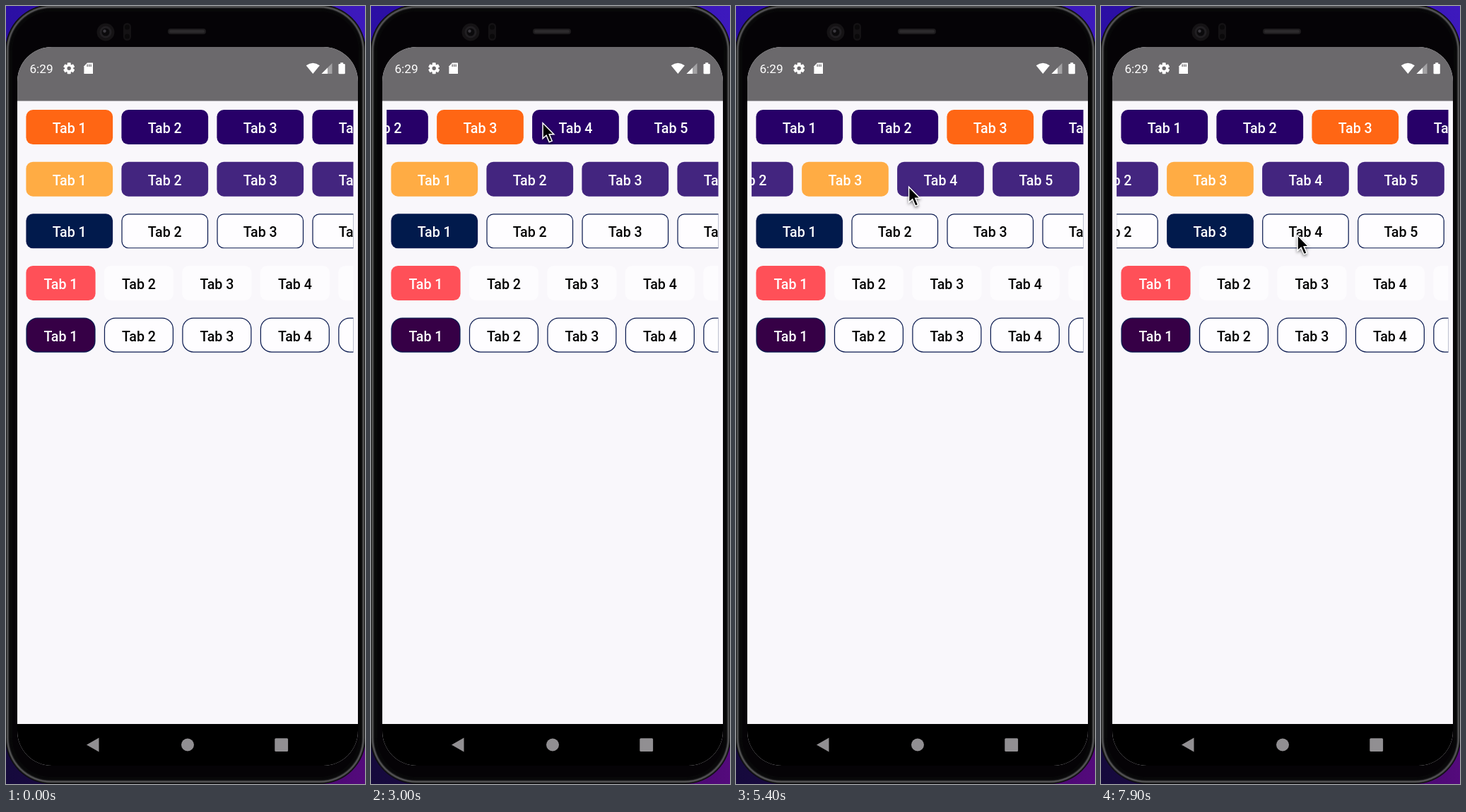
An HTML page with a canvas for the animation above (8 s loop, 508 by 1102 pixels).

```html
<!DOCTYPE html>
<html lang="en">
<head>
<meta charset="utf-8">
<title>Tab rows</title>
<style>
  html, body { margin: 0; width: 100%; height: 100%; overflow: hidden; background: #000; }
  canvas { display: block; width: 508px; height: 1102px; }
</style>
</head>
<body>
<canvas id="stage"></canvas>
<script>
const W = 508, H = 1102, LOOP = 8000;
const DP = 482 / 392.73;          // pixels per density-independent unit
const MAX_SCROLL = 205.3;
const BAR = '#6b696c', NAVY = '#0a1a50';
const canvas = document.getElementById('stage');
const ctx = canvas.getContext('2d');
const dpr = window.devicePixelRatio || 1;
canvas.width = W * dpr;
canvas.height = H * dpr;

// Every visit to a row runs the same script, in ms after its start.
const STEP = { tap2: 220, leave: 250, reach3: 600, tap3: 670, rest: 870,
  grab: 950, drop: 1350, regrab: 1550, redrop: 1950 };

const rows = [
  { w: 100, r: 8, on: '#ff6614', off: '#270068', ink: '#fff',
    visit: { start: 1550, from: [231, 169], to: [243, 166], back: true } },
  { w: 100, r: 8, on: '#ffac44', off: '#43257f', ink: '#fff',
    visit: { start: 3950, from: [214, 235], to: [245, 254] } },
  { w: 100, r: 8, on: '#011a4c', off: '#fefdff', ink: '#000', line: NAVY,
    visit: { start: 6100, from: [235, 311], to: [278, 325] } },
  { w: 80, r: 8, on: '#ff5058', off: '#fdfcfe', ink: '#000' },
  { w: 80, r: 13, on: '#360046', off: '#fefdff', ink: '#000', line: NAVY }
];

function visitPath({ start, from, to, back }) {
  const [x, y] = to, right = x + MAX_SCROLL;
  const keys = [[0, ...from], [STEP.leave, ...from], [STEP.reach3, 377, y],
    [STEP.rest, 377, y], [STEP.grab, right, y], [STEP.drop, x, y]];
  if (back) keys.push([STEP.regrab, x, y], [STEP.redrop, right, y]);
  return keys.map(([t, ...at]) => [start + t, ...at]);
}

const path = [[1150, 512, 420], ...rows.filter(r => r.visit).flatMap(r => visitPath(r.visit))];

const ease = k => k * k * (3 - 2 * k);
const ramp = (t, a, b) => ease(Math.min(1, Math.max(0, (t - a) / (b - a))));

function rowState({ visit }, t) {
  if (!visit) return { active: 1, scroll: 0 };
  const s = t - visit.start;
  let pull = ramp(s, STEP.grab, STEP.drop);
  if (visit.back) pull -= ramp(s, STEP.regrab, STEP.redrop);
  return { active: 1 + (s >= STEP.tap2) + (s >= STEP.tap3), scroll: MAX_SCROLL * pull };
}

function fillBox(x, y, w, h, r, color) {
  ctx.beginPath();
  ctx.roundRect(x, y, w, h, r);
  ctx.fillStyle = color;
  ctx.fill();
}

function disc(x, y, r, color) {
  ctx.beginPath();
  ctx.arc(x, y, r, 0, Math.PI * 2);
  ctx.fillStyle = color;
  ctx.fill();
}

function poly(points, color) {
  ctx.beginPath();
  points.forEach(([x, y]) => ctx.lineTo(x, y));
  ctx.closePath();
  ctx.fillStyle = color;
  ctx.fill();
}

function backdrop(y, ...colors) {
  const g = ctx.createLinearGradient(0, 0, W, 0);
  colors.forEach((c, i) => g.addColorStop(i / (colors.length - 1), c));
  ctx.fillStyle = g;
  ctx.fillRect(0, y, W, H / 2);
}

function drawPhone() {
  backdrop(0, '#2b0fa4', '#3d19bd');
  backdrop(H / 2, '#150a3c', '#2a0750', '#540a7c');

  // metal rim: brightest a few pixels in, fading to black
  for (let d = 0; d <= 9; d += 0.5) {
    const v = Math.round(8 + 82 * Math.exp(-(((d - 3) / 1.6) ** 2)));
    fillBox(d - 1, d - 2, W + 2 - 2 * d, H + 2 - 2 * d, 65 - d, `rgb(${v},${v},${v + 1})`);
  }
  fillBox(9, 8, W - 18, H - 18, 55, '#050306');

  disc(141, 37, 12.5, '#151315');
  disc(141, 37, 8.5, '#211f22');
  disc(141, 37, 5.5, '#0b0a0c');
  disc(139.5, 35.5, 2.2, '#3b393f');
  fillBox(166, 24, 11, 25, 5.5, '#141214');
  for (const y of [30, 43]) disc(171.5, y, 3.5, '#0a090a');
  fillBox(229, 32, 54, 8, 4, '#1d1b1d');
  fillBox(231, 34, 50, 4, 2, '#2c2a2c');
}

function drawGear(x, y) {
  ctx.save();
  ctx.translate(x, y);
  for (let i = 0; i < 6; i++) {
    fillBox(-2.5, -8, 5, 6, 0.8, '#fff');
    ctx.rotate(Math.PI / 3);
  }
  disc(0, 0, 5.9, '#fff');
  disc(0, 0, 2.7, BAR);
  ctx.restore();
}

function drawStatus() {
  ctx.font = '17.2px Roboto, sans-serif';
  ctx.textAlign = 'left';
  ctx.fillStyle = '#fff';
  ctx.fillText('6:29', 33.4, 95);
  drawGear(89.2, 88.3);

  poly([[115, 80.5], [123, 80.5], [123, 96], [110.4, 96], [110.4, 85.2]], '#fff');
  ctx.fillStyle = BAR;
  for (let i = 0; i < 3; i++) ctx.fillRect(114.5 + 2.5 * i, 82.5, 1.3, 3.5);

  ctx.beginPath();
  ctx.moveTo(434.3, 96);
  ctx.lineTo(424.7, 84.3);
  ctx.quadraticCurveTo(434.3, 77, 443.9, 84.3);
  ctx.closePath();
  ctx.fillStyle = '#fff';
  ctx.fill();

  const signal = (size, color) =>
    poly([[446.5, 96], [446.5 + size, 96], [446.5 + size, 96 - size]], color);
  signal(15, '#a3a2a4');
  signal(8.5, '#fff');

  fillBox(470.5, 82, 9.3, 14.3, 1.3, '#fff');
  ctx.fillRect(473.2, 80.2, 4, 2.5);
}

function drawNav() {
  const grey = '#918f92';
  ctx.fillStyle = '#000';
  ctx.fillRect(16, 1017, 482, 60);
  poly([[114, 1046.5], [131.5, 1036.5], [131.5, 1056.5]], grey);
  disc(257, 1046.5, 9, grey);
  fillBox(380.3, 1037.3, 18.8, 18.8, 1.5, grey);
}

function drawRow(row, index, t) {
  const y = 147 + index * 60 * DP, w = row.w * DP, h = 40 * DP;
  const { active, scroll } = rowState(row, t);

  ctx.save();
  ctx.beginPath();
  ctx.rect(22.1, y - 2, 469.4, h + 4);
  ctx.clip();
  ctx.font = '500 19.6px Roboto, sans-serif';
  ctx.textAlign = 'center';
  for (let tab = 1; tab <= 5; tab++) {
    const x = 28.4 + (tab - 1) * (row.w + 10) * DP - scroll;
    const fill = tab === active ? row.on : row.off;
    const r = row.r * DP, b = 1.23;
    fillBox(x, y, w, h, r, row.line || fill);
    if (row.line) fillBox(x + b, y + b, w - 2 * b, h - 2 * b, r - b, fill);
    ctx.fillStyle = tab === active ? '#fff' : row.ink;
    ctx.fillText('Tab ' + tab, x + w / 2, y + 33);
  }
  ctx.restore();
}

function drawScreen(t) {
  ctx.save();
  ctx.beginPath();
  ctx.roundRect(16, 58, 482, 1018, 49);
  ctx.clip();
  ctx.fillStyle = '#f9f7fb';
  ctx.fillRect(16, 58, 482, 1018);
  ctx.fillStyle = BAR;
  ctx.fillRect(16, 58, 482, 76.5);
  drawStatus();
  rows.forEach((row, i) => drawRow(row, i, t));
  drawNav();
  ctx.restore();
}

function pointerAt(t) {
  const i = path.findIndex(p => p[0] > t);
  if (i < 0) return path[path.length - 1].slice(1);
  const [a, x0, y0] = path[i - 1], [b, x1, y1] = path[i];
  const k = ramp(t, a, b);
  return [x0 + (x1 - x0) * k, y0 + (y1 - y0) * k];
}

function drawPointer(t) {
  if (t < path[0][0]) return;
  const [x, y] = pointerAt(t);
  const arrow = [[0, 0], [0, 18.5], [4.6, 14.3], [8.8, 24.2], [11.4, 23.1],
    [7.3, 13.4], [13.2, 13.4]];
  ctx.save();
  ctx.translate(x + 0.8, y + 1.6);
  ctx.shadowColor = 'rgba(0,0,0,.4)';
  ctx.shadowBlur = 4 * dpr;
  ctx.shadowOffsetY = 2 * dpr;
  poly(arrow, '#000');
  ctx.strokeStyle = '#fff';
  ctx.lineWidth = 3;
  ctx.stroke();
  ctx.shadowColor = 'transparent';
  ctx.fill();
  ctx.restore();
}

const start = performance.now();
function tick() {
  const t = (performance.now() - start) % LOOP;
  ctx.setTransform(dpr, 0, 0, dpr, 0, 0);
  drawPhone();
  drawScreen(t);
  drawPointer(t);
  requestAnimationFrame(tick);
}
tick();
</script>
</body>
</html>
```
